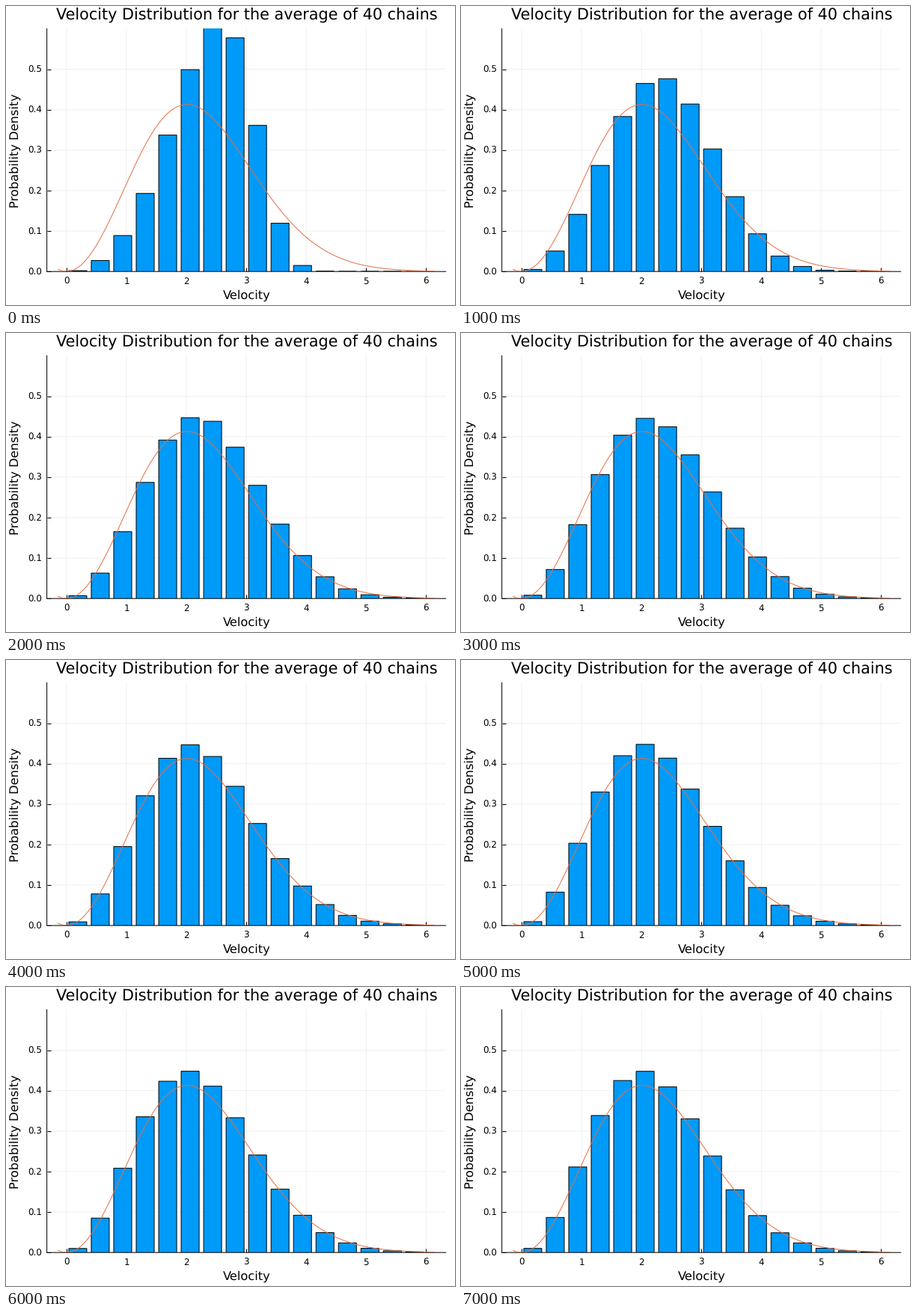
These frames come from a looping animation (600 px wide and 400 px high, 8 s). A matplotlib script:

```python
import matplotlib.pyplot as plt
import numpy as np
from matplotlib.animation import FuncAnimation

W, H, DPI = 600, 400, 100
PX = 72 / DPI  # points per pixel
LEFT, RIGHT, TOP, BOTTOM = 54.6, 587.7, 30.4, 355.2
X0, X1, Y1 = -0.3287, 6.3287, 0.6
BINS, STEP = 16, 0.375
CENTERS = STEP * (np.arange(BINS) + 0.5)
PEAK = 2.01  # most likely speed

plt.rcParams.update({"font.family": "DejaVu Sans", "text.hinting": "none",
                     "path.snap": False})


def shape(v, rise=2, scale=PEAK, decay=2):
    """Speed distribution before normalising; the defaults give Maxwell's."""
    return np.abs(v)**rise * np.exp(-np.abs(v / scale)**decay)


def heights(second):
    """A steep early histogram that relaxes to the Maxwell shape."""
    excess = 4 / (1 + second)**2
    h = shape(CENTERS, 2 + 0.08 * excess, 2 + np.exp(-second / 2), 2 + excess)
    area = (BINS + 1) / BINS
    return h * area / (h.sum() * STEP)


def label(x, y, text, size, ha="center", rotation=0):
    """Place text by its baseline, in pixels from the top left."""
    fig.text(x / W, 1 - y / H, text, fontsize=size * PX, ha=ha, va="baseline",
             rotation=rotation, rotation_mode="anchor")


fig = plt.figure(figsize=(W / DPI, H / DPI), dpi=DPI, facecolor="white")
ax = fig.add_axes([LEFT / W, 1 - BOTTOM / H, (RIGHT - LEFT) / W, (BOTTOM - TOP) / H])
ax.set(xlim=(X0, X1), ylim=(0, Y1), xticks=range(7), yticks=np.arange(6) / 10)
ax.set_axisbelow(True)
ax.grid(color="black", alpha=0.06, lw=PX)
ax.tick_params(direction="in", length=5 * PX, width=PX,
               labelbottom=False, labelleft=False)
ax.spines[["top", "right"]].set_visible(False)
for side in ("left", "bottom"):
    ax.spines[side].set(linewidth=PX, zorder=0.6)

for i in range(7):
    label(LEFT + (i - X0) / (X1 - X0) * (RIGHT - LEFT), 371.5, str(i), 11.85)
for i in range(6):
    y = BOTTOM - i / 10 / Y1 * (BOTTOM - TOP)
    label(48, y + 4.4, f"{i / 10:.1f}", 11.85, ha="right")
label(322, 18.5, "Velocity Distribution for the average of 40 chains", 20.74)
label(321.7, 392, "Velocity", 16.3)
label(16.8, 193.2, "Probability Density", 16.3, rotation=90)

bars = ax.bar(CENTERS, heights(0), width=0.8 * STEP, color="#009AF9",
              edgecolor="black", linewidth=PX, zorder=2)
v = np.linspace(-0.14, 6.14, 300)
ax.plot(v, 4 / np.sqrt(np.pi) / PEAK**3 * shape(v), color="#E26F46", lw=PX, zorder=3)


def draw(second):
    for bar, height in zip(bars, heights(second)):
        bar.set_height(height)
    return bars.patches


anim = FuncAnimation(fig, draw, frames=8, interval=1000, repeat=True, blit=False)
plt.show()
```
